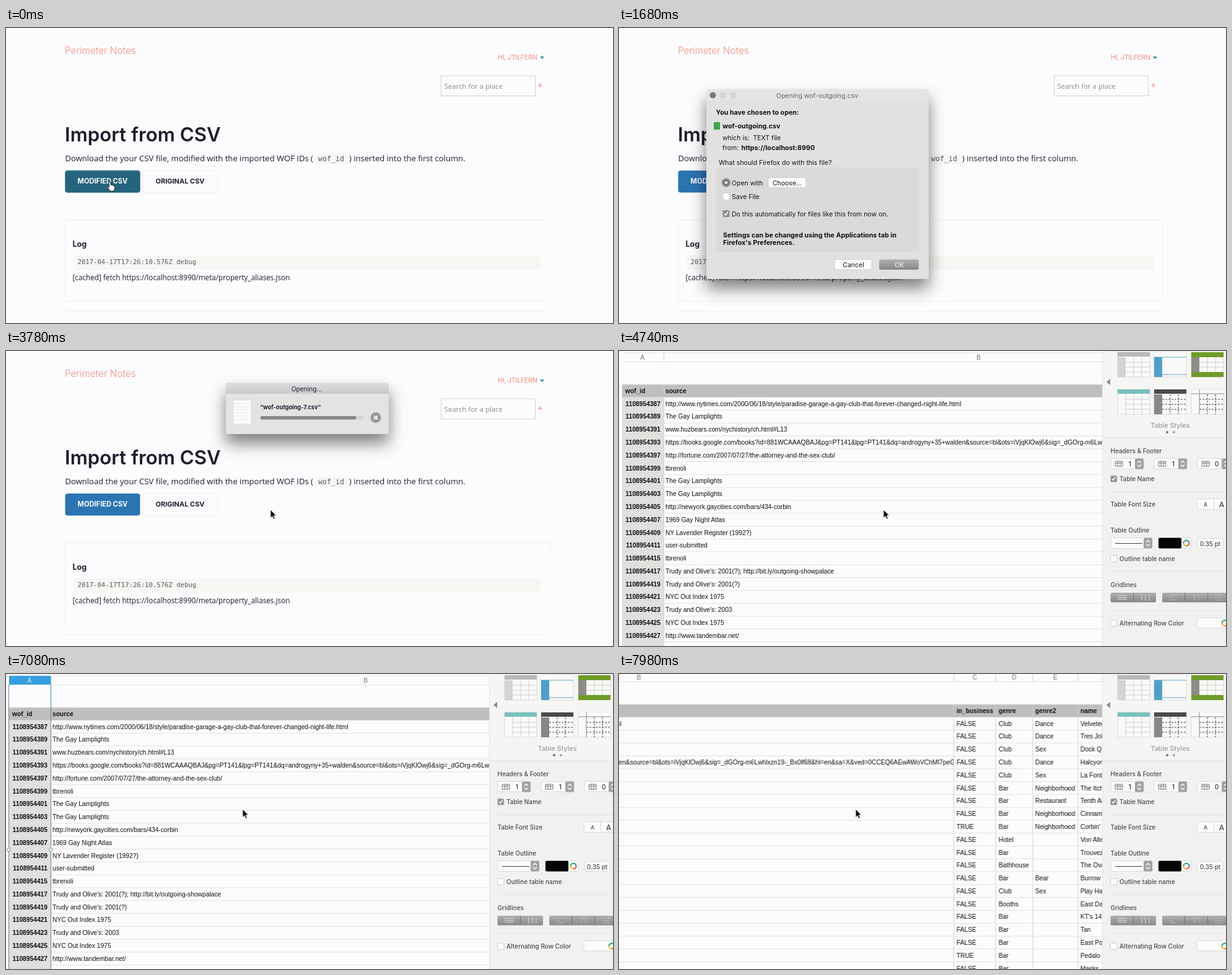
Animation, 980 px wide and 476 px high, one loop 8 s. Source, as an HTML page:

```html
<!DOCTYPE html>
<html lang="en">
<head>
<meta charset="utf-8">
<title>CSV import</title>
<style>
html, body { margin: 0; width: 100%; height: 100%; overflow: hidden; background: #fcfcfe; }
svg { display: block; width: 980px; height: 476px; }
text { font-family: Inter, sans-serif; fill: #211b2e; white-space: pre; }
.open { font-family: "Open Sans", sans-serif; }
.mono { font-family: "DejaVu Sans Mono", monospace; fill: #5a5860; }
.cell { font-family: "Liberation Sans", sans-serif; font-size: 10.25px; fill: #111; }
.letter { fill: #77777a; }
.bold { font-weight: 700; }
.ui { font-size: 10.5px; fill: #151515; }
.strong { font-size: 10.7px; font-weight: 700; fill: #111; }
.panel { font-size: 10px; font-weight: 500; fill: #4c4c4e; }
.mid { text-anchor: middle; }
.end { text-anchor: end; }
.link { fill: #f29080; }
.white { fill: #fcfcfe; }
.line { fill: none; stroke: #f0f0e9; }
.soft { filter: drop-shadow(0 15px 13px rgba(0,0,0,.5)); }

.cut, .move { animation: 8s infinite; }
.cut { animation-timing-function: step-end; }
.move { animation-timing-function: ease-in-out; }
#page { animation-name: page; }
#sheet { animation-name: sheet; }
#hover { animation-name: hover; }
#hand { animation-name: hand; }
#dialog { animation-name: dialog; }
#copying { animation-name: copying; }
#picked { animation-name: picked; }
#thumb { animation-name: thumb; }
#arrow { animation-name: arrow; }
#bar { animation-name: bar; transform-origin: 411px 0; }
#pointer { animation-name: pointer; }
#pointer path { animation-name: shown; }
#scroll { animation-name: scroll; }

@keyframes page { 0% { opacity: 1 } 57%, 100% { opacity: 0 } }
@keyframes sheet { 0% { opacity: 0 } 57%, 100% { opacity: 1 } }
@keyframes hover { 0% { opacity: 1 } 11.25% { opacity: 0 } 21.75% { opacity: 1 } 33.5%, 100% { opacity: 0 } }
@keyframes hand { 0% { opacity: 1 } 13.5%, 100% { opacity: 0 } }
@keyframes dialog { 0% { opacity: 0 } 13.5% { opacity: 1 } 21.7%, 100% { opacity: 0 } }
@keyframes copying { 0% { opacity: 0 } 41%, 100% { opacity: 1 } }
@keyframes picked { 0% { opacity: 0 } 74.2%, 100% { opacity: 1 } }
@keyframes thumb { 0% { opacity: 0 } 91.5% { opacity: 1 } 97.5%, 100% { opacity: 0 } }
@keyframes shown { 0% { opacity: 0 } 21.7%, 100% { opacity: 1 } }
@keyframes bar {
  0%, 41% { transform: scaleX(.05) }
  45%, 48% { transform: scaleX(.928) }
  52%, 100% { transform: scaleX(1) }
}
@keyframes arrow {
  0%, 21.75% { opacity: 0; transform: translate(757px, 111px) scale(8); animation-timing-function: cubic-bezier(.15,.55,.3,1) }
  24.25% { opacity: .85; animation-timing-function: ease-out }
  34.25%, 100% { opacity: 0; transform: translate(885px, -17px) scale(1) }
}
@keyframes pointer {
  0%, 32.5% { transform: translate(166px, 247px) }
  38%, 60% { transform: translate(427px, 256px) }
  72%, 76% { transform: translate(46px, 7px) }
  86%, 100% { transform: translate(382px, 218px) }
}
@keyframes scroll {
  0%, 91.25% { transform: translate(0, 0); animation-timing-function: ease-in }
  93.75% { transform: translate(-38px, -6.5px); animation-timing-function: cubic-bezier(.35,.2,.75,.85) }
  99.75%, 100% { transform: translate(-548.5px, -5px) }
}
</style>
</head>
<body>
<svg viewBox="0 0 980 476">
  <defs>
    <clipPath id="pane"><rect width="780" height="476"/></clipPath>
    <clipPath id="colB"><rect x="73" width="1016" height="500"/></clipPath>
    <linearGradient id="metal" x2="0" y2="1"><stop stop-color="#b0b0b0"/><stop offset="1" stop-color="#878787"/></linearGradient>
    <linearGradient id="title" x2="0" y2="1"><stop stop-color="#dededf"/><stop offset="1" stop-color="#c9c9ca"/></linearGradient>
  </defs>

  <g id="page" class="cut">
    <text x="95" y="41.5" font-size="15.3" font-weight="300" class="link">Perimeter Notes</text>
    <text x="794" y="51" font-size="11" letter-spacing="-.4" class="link">HI, JTILFERN</text>
    <path d="M862 46h7l-3.5 4z" fill="#3f86a0"/>
    <rect x="702.5" y="77" width="152" height="32.5" class="line" style="stroke:#d2d2cc"/>
    <text x="707.5" y="98" font-size="11.4" class="open" style="fill:#8a8a8a">Search for a place</text>
    <path d="M859 92.5h7m-3.5-3.5v7" stroke="#f29080" stroke-width="1.2"/>
    <text x="95" y="183" font-size="31.2" font-weight="600">Import from CSV</text>
    <rect x="499" y="203" width="54" height="17" rx="3" fill="#f6f6f3"/>
    <text x="95.5" y="215" font-size="13.06" class="open">Download the your CSV file, modified with the imported WOF IDs (</text>
    <text x="504" y="215" font-size="11.6" class="mono">wof_id</text>
    <text x="554" y="215" font-size="13.06" class="open">) inserted into the first column.</text>
    <rect x="95.5" y="230" width="121" height="35.5" rx="4" fill="#2b74b2"/>
    <rect id="hover" class="cut" x="95.5" y="230" width="121" height="35.5" rx="4" fill="#24647c" stroke="#5d8fb0"/>
    <text x="156" y="251" font-size="11.1" class="bold mid white">MODIFIED CSV</text>
    <rect x="220.5" y="230" width="121" height="35.5" rx="4" class="line"/>
    <text x="281" y="251" font-size="11" class="bold mid">ORIGINAL CSV</text>
    <rect x="95.5" y="309.5" width="782.5" height="131" class="line"/>
    <text x="107.5" y="352.5" font-size="12.6" class="bold">Log</text>
    <rect x="110" y="367" width="753" height="23" fill="#f6f6f3"/>
    <text x="115.5" y="381" font-size="10.62" class="mono">2017-04-17T17:26:10.576Z debug</text>
    <text x="107.5" y="407" font-size="11.72" class="open">[cached] fetch https://localhost:8990/meta/property_aliases.json</text>
    <path d="M95 457.5h783" class="line"/>

    <g id="hand" class="cut">
      <path d="M166 248.5c1.8-1.2 2.8.3 2.9 1.8l.2 3c1.5-.8 2.3-.2 2.6.8 1.3-.6 2.1 0 2.3 1 1.4-.3 2 .5 1.9 2.2 0 3-1.2 3.3-1.4 5.9h-6.5c-1-2.900-3.2-3.6-4.5-6.7 1-1.2 2.2-.3 3 .6z" fill="#fff" stroke="#111"/>
    </g>

    <g id="dialog" class="cut">
      <rect x="141" y="99" width="359" height="306" rx="4" fill="#e1e1e0" class="soft"/>
      <path d="M141 118v-15q0-4 4-4h351q4 0 4 4v15z" fill="#e4e4e4"/>
      <circle cx="151.5" cy="108.5" r="5" fill="#777"/>
      <g fill="#d6d6d6" stroke="#c9c9c9"><circle cx="168" cy="108.5" r="4.7"/><circle cx="184" cy="108.5" r="4.7"/></g>
      <text x="320" y="112.5" class="mid" font-size="10.5" style="fill:#656565">Opening wof-outgoing.csv</text>
      <text x="156.5" y="140" class="strong">You have chosen to open:</text>
      <rect x="153" y="152" width="10" height="12" fill="#3fa34d"/>
      <text x="167" y="162" class="strong">wof-outgoing.csv</text>
      <text x="167" y="181" class="ui">which is:  TEXT file</text>
      <text x="167" y="196.5" class="ui">from:</text>
      <text x="197.5" y="196.5" class="strong">https://localhost:8990</text>
      <text x="161" y="221" class="ui">What should Firefox do with this file?</text>
      <rect x="157" y="225" width="327" height="137" fill="#dadad9"/>
      <circle cx="173" cy="249.5" r="6.5" fill="#777" stroke="#a2a2a2" stroke-width="2"/>
      <circle cx="173" cy="249.5" r="2.2" fill="#fff"/>
      <text x="182" y="253.5" class="ui">Open with</text>
      <rect x="241" y="241.5" width="61" height="16" rx="3" fill="#fcfcfc" stroke="#cfcfcf"/>
      <text x="271.5" y="253.5" class="ui mid">Choose...</text>
      <circle cx="173" cy="272" r="6" fill="#fcfcfc" stroke="#c9c9c9"/>
      <text x="182" y="276" class="ui">Save File</text>
      <rect x="167.5" y="294" width="11" height="11" rx="2" fill="#8f8f8f"/>
      <path d="M170 299.5l2.2 2.5 3.8-5.5" fill="none" stroke="#fff" stroke-width="1.5"/>
      <text x="182" y="303.5" class="ui">Do this automatically for files like this from now on.</text>
      <text x="168" y="337.5" class="strong">Settings can be changed using the Applications tab in</text>
      <text x="168" y="350" class="strong">Firefox's Preferences.</text>
      <rect x="348" y="373.5" width="60" height="16.5" rx="3" fill="#fcfcfc" stroke="#cfcfcf"/>
      <text x="378.5" y="385.5" class="ui mid">Cancel</text>
      <rect x="420" y="373.5" width="64" height="16.5" rx="3" fill="url(#metal)"/>
      <text x="452.5" y="385.5" class="ui mid white">OK</text>
    </g>

    <g id="copying" class="cut">
      <rect x="355" y="51" width="263" height="83" rx="4" fill="#e3e3e2" class="soft"/>
      <path d="M355 69v-14q0-4 4-4h255q4 0 4 4v14z" fill="url(#title)"/>
      <text x="485.5" y="64.5" class="mid" font-size="10.2">Opening...</text>
      <rect x="367" y="79" width="29" height="39" fill="#fafaf8" stroke="#dcdcdc"/>
      <path d="M371 85h12m-12 5h20m-20 5h18m-18 5h20m-20 5h16m-16 5h19" stroke="#e8e8e4"/>
      <text x="410" y="94" font-size="9.2" class="bold">“wof-outgoing-7.csv”</text>
      <rect x="411" y="105" width="166" height="5.5" rx="2" fill="#d2d2d2"/>
      <rect id="bar" class="move" x="411" y="105" width="166" height="5.5" rx="2" fill="#868686"/>
      <circle cx="597" cy="107.5" r="8.5" fill="#999"/>
      <path d="M594 104.5l6 6m0-6l-6 6" stroke="#fff" stroke-width="1.8"/>
    </g>
    <path id="arrow" class="move" d="M-4-8.3h8v7.3h5L0 8.3-9-1h5z" fill="#707070"/>
  </g>

  <g id="sheet" class="cut">
    <rect width="980" height="476" fill="#fcfcfe"/>
    <g clip-path="url(#pane)">
      <g id="scroll" class="move"></g>
      <rect id="thumb" class="cut" x="772" y="-8" width="6" height="22" rx="3" fill="#949494"/>
    </g>
    <g id="inspector"></g>
  </g>

  <g id="pointer" class="move">
    <path class="cut" d="M0 0v13.5l3-2.8 2 4.6 2.3-1-2-4.5h4.2z" fill="#111" stroke="#fff" stroke-width=".8"/>
  </g>
</svg>

<script>
const esc = s => String(s).replace(/&/g, "&amp;");
const text = (x, y, s, cls, extra = "") => `<text x="${x}" y="${y}" class="${cls}" ${extra}>${esc(s)}</text>`;
const rect = (x, y, w, h, fill, extra = "") => `<rect x="${x}" y="${y}" width="${w}" height="${h}" fill="${fill}" ${extra}/>`;
const path = (d, stroke, extra = "") => `<path d="${d}" fill="none" stroke="${stroke}" ${extra}/>`;
const ring = (x, y, r, fill, stroke) => `<circle cx="${x}" cy="${y}" r="${r}" fill="${fill}" stroke="${stroke}"/>`;

// id suffix | source | genre | genre2 | name
const rows = `
387|http://www.nytimes.com/2000/06/18/style/paradise-garage-a-gay-club-that-forever-changed-night-life.html|Club|Dance|Velveteen
389|The Gay Lamplights|Club|Dance|Tres Joli
391|www.huzbears.com/nychistory/ch.html#L13|Club|Sex|Dock Q
393|https://books.google.com/books?id=881WCAAAQBAJ&pg=PT141&lpg=PT141&dq=androgyny+35+walden&source=bl&ots=iVjqKlOwj6&sig=_dGOrg-m6Lwhlxzn19-_Bx0lf68&hl=en&sa=X&ved=0CCEQ6AEwAWoVChMI7peG5vTKxwIV|Club|Dance|Halcyonic
397|http://fortune.com/2007/07/27/the-attorney-and-the-sex-club/|Club|Sex|La Fontane
399|tbrenoli|Bar|Neighborhood|The Itchy
401|The Gay Lamplights|Bar|Restaurant|Tenth Arch
403|The Gay Lamplights|Bar|Neighborhood|Cinnamon
405|http://newyork.gaycities.com/bars/434-corbin|Bar|Neighborhood|Corbin'
407|1969 Gay Night Atlas|Hotel||Von Altena
409|NY Lavender Register (1992?)|Bar||Trouvez
411|user-submitted|Bathhouse||The Ovals
415|tbrenoli|Bar|Bear|Burrow
417|Trudy and Olive's: 2001(?); http://bit.ly/outgoing-showpalace|Club|Sex|Play Hall
419|Trudy and Olive's: 2001(?)|Booths||East Dale
421|NYC Out Index 1975|Bar||KT's 14
423|Trudy and Olive's: 2003|Bar||Tan
425|NYC Out Index 1975|Bar||East Point
427|http://www.tandembar.net/|Bar||Pedalo
429|NYC Out Index 1975|Bar||Masks`.trim().split("\n").map(r => r.split("|"));

const top0 = 74.7, step = 20.78, edges = [72.5, 1089, 1156.5, 1216.5, 1289.5, 1400];
const rule = "#e2e2dd", frame = "#dadad8", dark = "#444";

function table() {
  const bottom = top0 + rows.length * step;
  let s = rect(5, 54, 1395, 20.7, "#bdbebd") + rect(5, top0, 67, bottom - top0, "#dfdfdd");
  s += path("M5 17.5H1400M5 54H1400M5 3H1400", rule);
  s += text(38, 14, "A", "cell letter mid");
  "BCDEF".split("").forEach((c, i) =>
    s += text((edges[i] + edges[i + 1]) / 2, 14, c, "cell letter mid"));
  edges.slice(0, 5).forEach(x => s += path(`M${x} 3V17M${x} 54V${bottom}`, "#d2d2cf"));

  const columns = [75, 1093.5, 1161.5, 1220.5, 1293.5];
  s += text(10, 68, "wof_id", "cell bold");
  ["source", "in_business", "genre", "genre2", "name"].forEach((h, i) => s += text(columns[i], 68, h, "cell bold"));

  rows.forEach(([id, source, ...rest], i) => {
    const y = top0 + i * step, base = y + 14;
    s += path(`M5 ${y + step}H1400`, rule);
    s += text(67, base, "1108954" + id, "cell bold end");
    s += text(75, base, source, "cell", 'clip-path="url(#colB)"');
    const open = id === "405" || id === "427" ? "TRUE" : "FALSE";
    [open, ...rest].forEach((v, k) => s += text(columns[k + 1], base, v, "cell"));
  });

  return s + `<g id="picked" class="cut">` + rect(5, 3, 67.5, 14, "#379fdf") +
    text(38, 14, "A", "cell mid", 'style="fill:#d4e8f2"') +
    path(`M4.5 17V${bottom}M72.5 17V${bottom}`, "#5b87a4") +
    ring(4.5, 283.5, 2.7, "#fcfcfe", "#6d8f9c") + ring(72.5, 283.5, 2.7, "#fcfcfe", "#6d8f9c") + "</g>";
}

function swatch(x, y, head, side, grid, foot) {
  let s = rect(x, y, 52, 40, "#f9f9f8", `stroke="${frame}"`);
  if (grid) s += path(`M${x + 13} ${y + 16}h39m-39 8h39m-39 8h39M${x + 26} ${y + 8}v32m13-32v32`, grid,
    grid === dark ? 'stroke-dasharray="3 2"' : "");
  if (side) s += rect(x, y + 8, 13, 32, side);
  s += rect(x, y, 52, foot ? 8 : 7, head);
  return foot ? s + rect(x, y + 32, 52, 8, foot) : s;
}

const box = (x, y, w, h) => rect(x, y, w, h, "#fbfbfa", `rx="2" stroke="${frame}"`);
const chevrons = (x, y) => rect(x, y, 14, 17, "#a2a2a2", 'rx="2"') +
  path(`M${x + 4} ${y + 7}l3-3 3 3m-6 3l3 3 3-3`, "#fff", 'stroke-width="1.3"');
const check = (y, on, label) => rect(793.5, y - 5, 10.5, 10.5, on ? "#8f8f8f" : "#fcfcfc", 'rx="2" stroke="#cacaca"') +
  (on ? path(`M796 ${y}l2 2.5 3.6-5`, "#fff", 'stroke-width="1.4"') : "") + text(808, y + 3.7, label, "panel");
const gridIcon = (x, y) => path(`M${x} ${y}h12v8h-12zm0 3h12m-8-3v8m4-8v8`, "#777");
const wheel = (x, y) => ["#e8695a", "#e6c545", "#58b368", "#5a8fd0"].map((c, i) =>
  `<circle cx="${x}" cy="${y}" r="4.5" fill="none" stroke="${c}" stroke-width="2.5" pathLength="4" stroke-dasharray="1 3" stroke-dashoffset="${-i}"/>`).join("");

function inspector() {
  const paper = "#f9f9f8", grid = "#cfcfcd", top = "#f5f5f3";
  let s = rect(780, 0, 200, 476, "#f1f1ef") + rect(780, 0, 200, 139, top);
  s += path("M780.5 0V476M780 139.5H980", "#e4e4df");
  s += swatch(805, 2, "#b8b8b7", "#d3d3d1", grid);
  s += swatch(864, 2, paper, "#4f9fc8") + path("M864 10h52m-52 28h52", "#5fa5c4");
  s += swatch(924, 2, "#6f9c28", "#8c8c88", grid, "#6f9c28");
  s += swatch(805, 62, "#78c0bc", "", grid) + path("M818 69v33", grid);
  s += swatch(864, 62, "#4a4a4a", "#878785", dark);
  s += swatch(924, 62, paper, "", dark) + path("M924 69h52m-39-7v40", "#888");
  s += rect(977, 0, 3, 139, top);
  s += `<path d="M793 45v10l-6-5z" fill="#8a8a86"/>`;
  s += text(890, 124, "Table Styles", "panel mid", 'style="font-size:10.8px;fill:#9c9c9a"');
  s += ring(885, 131, 2, "#777", "none") + ring(896, 131, 2, "#a3a3a3", "none");

  const titles = [["Headers & Footer", 161], ["Table Font Size", 247.5], ["Table Outline", 289], ["Gridlines", 377]];
  titles.forEach(([label, y]) => s += text(793.5, y + 3.7, label, "panel"));
  [[794, 1], [864, 1], [934, 0]].forEach(([x, n]) => {
    s += box(x, 173.5, 53, 16.5) + gridIcon(x + 7, 178) + chevrons(x + 39, 173.5);
    s += text(x + 31, 186, n, "ui mid");
  });
  s += check(206, true, "Table Name") + check(335, false, "Outline table name") + check(439, false, "Alternating Row Color");
  s += path("M793 227.5H980M793 355.5H980M793 418.5H980", "#e4e4df");

  s += box(933, 238.5, 60, 17) + path("M960.5 239v16", frame);
  s += text(947, 251, "A", "panel mid", 'style="font-size:8.5px"') + text(973, 251.5, "A", "panel mid", 'style="font-size:12px"');
  s += box(794, 301.5, 67, 17) + path("M801 310.5h44", dark) + chevrons(847, 301.5);
  s += box(871, 301.5, 53, 17) + rect(871, 301.5, 37, 17, "#050505", 'rx="2"') + wheel(916, 310);
  s += box(934, 302.5, 41, 16) + text(954.5, 314.5, "0.35 pt", "panel mid");

  s += rect(793.5, 390, 73.5, 15.5, "url(#metal)", 'rx="2"') + rect(877, 390, 110, 15.5, "url(#metal)", 'rx="2"');
  s += path("M805 394.5h15m-15 3h15m-15 3h15M844 393v10m6-10v10m6-10v10", "#dadada");
  s += path("M830.5 390v15M913.5 390v15M950.5 390v15", "#777");
  s += path("M888 394.5h12m-12 3.5h6m-6 3.5h12M926 394h13m-10 0v8m7-8v8M962 394h13m-13 4h13m-13 4h13", "#b8b8b8");
  return s + box(933, 430.5, 60, 16.5) + wheel(978, 439);
}

document.getElementById("scroll").innerHTML = table();
document.getElementById("inspector").innerHTML = inspector();
</script>
</body>
</html>
```
